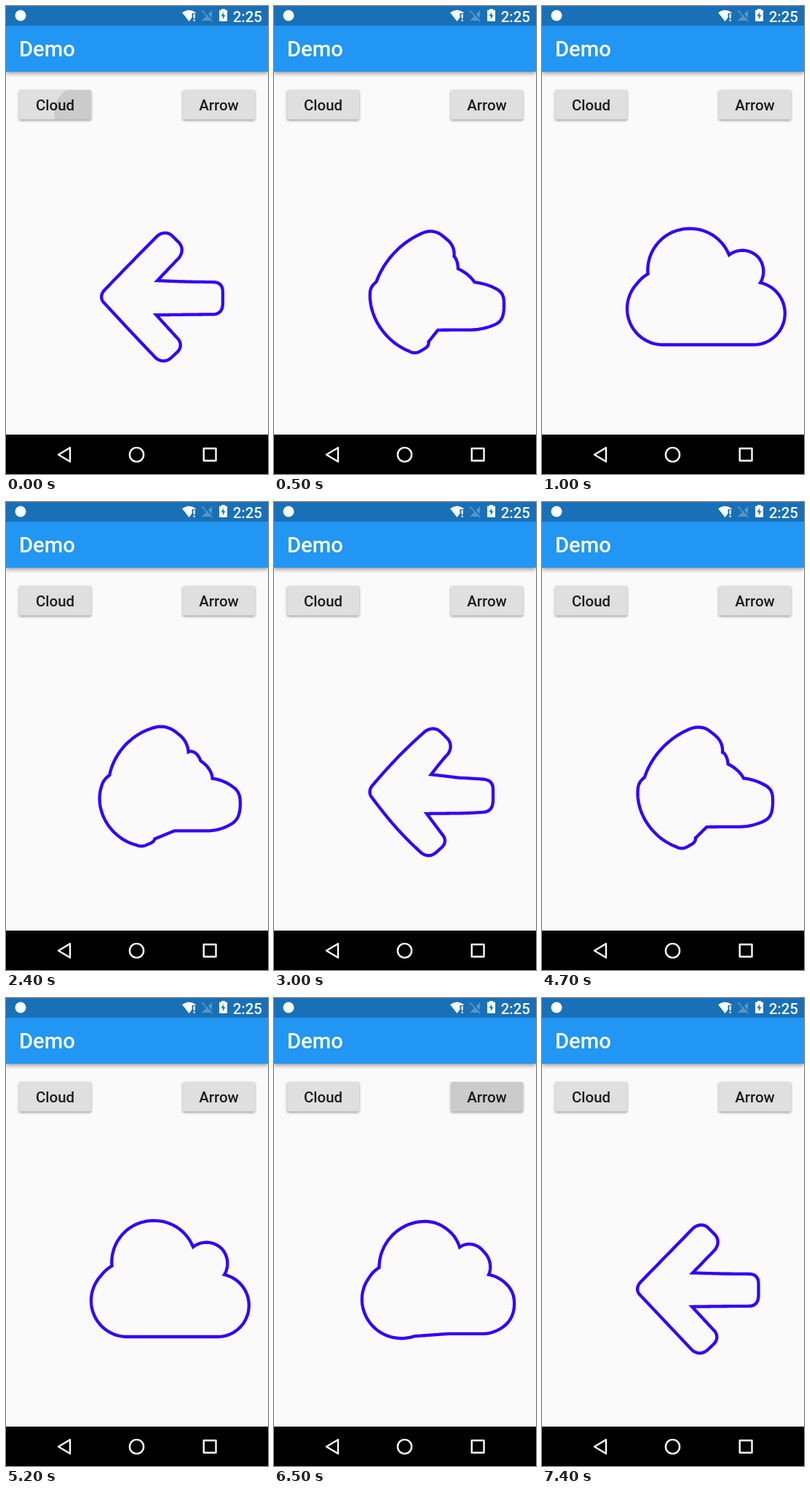
An HTML page with a canvas for the animation above (7500 ms loop, 360 by 641 pixels).

```html
<!DOCTYPE html>
<html lang="en">
<head>
<meta charset="utf-8">
<title>Shape morph</title>
<style>
  html, body { margin: 0; width: 100%; height: 100%; overflow: hidden; background: #fafafa; }
  canvas { display: block; width: 360px; height: 641px; }
</style>
</head>
<body>
<canvas id="stage"></canvas>
<script>
const LOOP = 7500, TICK = 100, WIDTH = 360, HEIGHT = 641;
const canvas = document.getElementById('stage');
const ctx = canvas.getContext('2d');
const ratio = window.devicePixelRatio || 1;
canvas.width = WIDTH * ratio;
canvas.height = HEIGHT * ratio;
ctx.scale(ratio, ratio);

// Matching outline segments: [arrow, cloud]
const segments = [
  ['M135.5 389L207 316', 'M145.5 367A57 57 0 0 1 204 305'],
  ['M207 316C213 310 222 309 228 314.5L237.5 324C243 330 243 338 237.5 345', 'M204 305A57 57 0 0 1 257 341'],
  ['M237.5 345L207 376.5', 'M257 341A30 30 0 0 1 297 344'],
  ['M207 376.5L250 377.7', 'M297 344A30 30 0 0 1 300 379'],
  ['M250 377.7L286 378Q297.5 379 297.5 391V408Q297 421 286 422L246 422.3', 'M300 379A43 43 0 0 1 290 464'],
  ['M246 422.3L206 422.8', 'M290 464H243.6'],
  ['M206 422.8L237 456', 'M243.6 464H188.5'],
  ['M237 456C242 462 241 469 236 474L228 481.5C221 488 213 488 206 482', 'M188.5 464H166'],
  ['M206 482L134 406', 'M166 464A49.5 49.5 0 0 1 130 381'],
  ['M134 406C130 401 130 395 135.5 389', 'M130 381A49.5 49.5 0 0 1 145.5 367']
];

// Evenly spaced points along a path
function sample(d, count = 32) {
  const path = document.createElementNS('http://www.w3.org/2000/svg', 'path');
  path.setAttribute('d', d);
  const length = path.getTotalLength();
  return Array.from({ length: count }, (_, i) => path.getPointAtLength(length * i / count));
}
const arrow = segments.flatMap(pair => sample(pair[0]));
const cloud = segments.flatMap(pair => sample(pair[1]));

const morphs = [
  { start: -10, duration: 1000, toCloud: true },
  { start: 2057, duration: 1045, toCloud: false },
  { start: 4160, duration: 1000, toCloud: true },
  { start: 6400, duration: 1000, toCloud: false }
];

const buttons = [{ x: 18, label: 'Cloud' }, { x: 243, label: 'Arrow' }];
const ripples = [
  { start: 0, button: 0, x: 104.6, y: 147, radius: 38.6, growth: 0.25 },
  { start: 2100, button: 1, x: 292, y: 136, radius: 110, growth: 0 },
  { start: 4200, button: 0, x: 110, y: 137, radius: 82, growth: 0 },
  { start: 6500, button: 1, x: 292, y: 136, radius: 110, growth: 0 }
];

function rect(x, y, w, h, color) {
  ctx.fillStyle = color;
  ctx.fillRect(x, y, w, h);
}

function circle(x, y, r) {
  ctx.beginPath();
  ctx.arc(x, y, r, 0, Math.PI * 2);
}

function polygon(...points) {
  ctx.beginPath();
  points.forEach(([x, y]) => ctx.lineTo(x, y));
  ctx.closePath();
}

function text(label, x, y, size, color, align = 'left') {
  ctx.font = `500 ${size}px Roboto, sans-serif`;
  ctx.textAlign = align;
  ctx.fillStyle = color;
  ctx.fillText(label, x, y);
}

function withShadow(blur, offset, alpha, draw) {
  ctx.save();
  ctx.shadowColor = `rgba(0,0,0,${alpha})`;
  ctx.shadowBlur = blur * ratio;
  ctx.shadowOffsetY = offset * ratio;
  draw();
  ctx.restore();
}

function drawStatusIcons() {
  ctx.fillStyle = '#fff';
  circle(20, 13, 7.5);
  ctx.fill();

  // Wireless fan with an alert mark
  ctx.beginPath();
  ctx.moveTo(242, 9);
  ctx.quadraticCurveTo(251.5, 2, 261, 9);
  ctx.lineTo(251.5, 21);
  ctx.closePath();
  ctx.fill();
  rect(255.5, 10, 6, 12, '#1970b6');
  rect(257.5, 11, 2.2, 6, '#fff');
  rect(257.5, 18.5, 2.2, 2.2, '#fff');

  // Signal off
  ctx.fillStyle = '#5795c9';
  polygon([283, 6], [283, 20], [269, 20]);
  ctx.fill();
  ctx.lineWidth = 1.8;
  ctx.strokeStyle = '#1970b6';
  polygon([270, 5], [284, 19]);
  ctx.stroke();
  ctx.strokeStyle = '#5795c9';
  polygon([269, 6], [283, 21]);
  ctx.stroke();

  // Charging battery
  rect(296, 4, 5, 3, '#fff');
  ctx.beginPath();
  ctx.roundRect(293, 5.5, 11, 15.5, 1);
  ctx.fill();
  ctx.fillStyle = '#1970b6';
  polygon([299.5, 8], [295.5, 14], [298, 14], [297.5, 18.5], [301.5, 12.5], [299, 12.5]);
  ctx.fill();
}

function drawBars() {
  withShadow(6, 2, 0.45, () => rect(0, 27, WIDTH, 63, '#2196f3'));
  rect(0, 0, WIDTH, 27, '#1970b6');
  drawStatusIcons();
  text('2:25', 352, 21.7, 20.475, '#fff', 'right');
  text('Demo', 18, 69, 29.25, '#fff');

  rect(0, 587, WIDTH, 54, '#000');
  ctx.strokeStyle = '#fff';
  ctx.lineWidth = 2.4;
  ctx.lineJoin = 'round';
  polygon([72, 614.5], [88, 605], [88, 624]);
  ctx.stroke();
  circle(179.5, 614.5, 9.6);
  ctx.stroke();
  ctx.strokeRect(271.7, 606, 16.8, 16.8);
}

function drawButton({ x, label }, index, time) {
  const outline = () => {
    ctx.beginPath();
    ctx.roundRect(x, 115, 99, 40.5, 2.2);
  };
  withShadow(3.5, 1.6, 0.4, () => {
    outline();
    ctx.fillStyle = '#dfdfdf';
    ctx.fill();
  });
  for (const ripple of ripples) {
    const age = time - ripple.start;
    if (ripple.button !== index || age < 0 || age >= 300) continue;
    ctx.save();
    outline();
    ctx.clip();
    circle(ripple.x, ripple.y, ripple.radius + age * ripple.growth);
    ctx.fillStyle = `rgba(0,0,0,${0.09 * (1 - age / 300)})`;
    ctx.fill();
    ctx.restore();
  }
  text(label, x + 49.5, 142.5, 20.475, 'rgba(0,0,0,0.87)', 'center');
}

function cloudAmount(time) {
  const { start, duration, toCloud } = morphs.findLast(m => time >= m.start);
  const progress = Math.min(1, (time - start) / duration);
  return toCloud ? progress : 1 - progress;
}

function drawShape(time) {
  const amount = cloudAmount(time);
  const mix = (a, b) => a + (b - a) * amount;
  polygon(...arrow.map((p, i) => [mix(p.x, cloud[i].x), mix(p.y, cloud[i].y)]));
  ctx.strokeStyle = '#3300ff';
  ctx.lineWidth = 4.3;
  ctx.lineJoin = 'miter';
  ctx.miterLimit = 4;
  ctx.stroke();
}

const origin = performance.now();
function render() {
  const elapsed = (performance.now() - origin) % LOOP;
  const time = Math.floor(elapsed / TICK) * TICK;
  rect(0, 0, WIDTH, HEIGHT, '#fafafa');
  drawBars();
  buttons.forEach((button, i) => drawButton(button, i, time));
  drawShape(time);
  requestAnimationFrame(render);
}
render();
</script>
</body>
</html>
```
